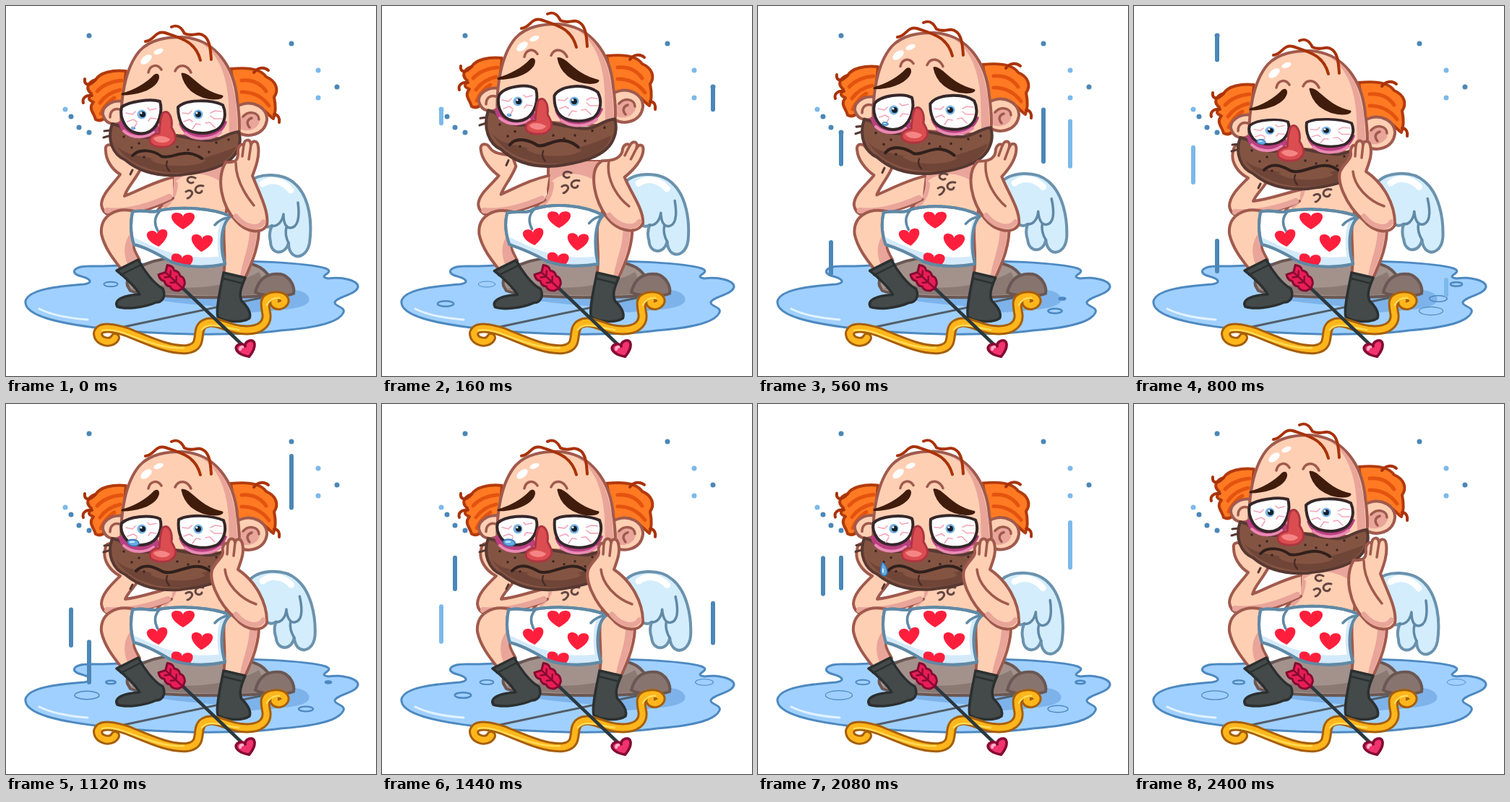
Animation of 512x512 px, one loop 2.48 s. Source, as an HTML page:

```html
<!DOCTYPE html>
<html lang="en">
<head>
<meta charset="utf-8">
<title>Gloomy cupid</title>
<style>
html, body { margin: 0; width: 100%; height: 100%; overflow: hidden; background: #fff; }
svg { display: block; width: 100vw; height: 100vh; stroke-linecap: round; stroke-linejoin: round; }
.line { fill: none; }
.skin { fill: #ffcfb3; stroke: #a05a4d; stroke-width: 4; }
.crease { fill: none; stroke: #a05a4d; stroke-width: 3.5; }
.shade { fill: #e9a59a; }
.rim { fill: none; stroke: #e9a59a; }
.hair { fill: #ff7a22; stroke: #b23a0c; stroke-width: 4; }
.wisp { fill: none; stroke: #a93208; stroke-width: 4; }
.strand { fill: none; stroke: #e4530f; stroke-width: 5; }
.boot { fill: #444a4a; stroke: #2b3031; stroke-width: 3.5; }
.rock { stroke: #6a5753; stroke-width: 4; }
.cloth { fill: #fff; stroke: #6089a5; stroke-width: 4; }
.fold { fill: none; stroke: #6089a5; stroke-width: 3.5; }
.eye { fill: #fff; stroke: #35272a; stroke-width: 4; }
.vein { fill: none; stroke: #f3a5b9; stroke-width: 1.6; }
.brow { fill: #401c0c; stroke: #401c0c; stroke-width: 3; }
</style>
</head>
<body>
<svg viewBox="0 0 512 512">
  <defs>
    <path id="heart" d="M0 11C-18 0 -17 -12 -8 -12C-3 -12 0 -9 0 -6C0 -9 3 -12 8 -12C17 -12 18 0 0 11Z"/>
    <clipPath id="cut"><path data-morph="cloth"/></clipPath>
  </defs>

  <path d="M27 408C32 392 70 388 108 385C122 383 116 377 104 374C88 370 92 360 116 360C150 361 190 356 250 354C330 350 420 356 442 363C458 369 428 374 446 377C465 374 488 380 487 389C484 400 458 402 455 410C454 416 470 416 467 424C460 440 420 446 380 449C330 456 230 456 150 448C70 440 24 428 27 408Z" fill="#a0d0ff" stroke="#4d89c0" stroke-width="3"/>
  <path d="M190 402C240 416 300 412 340 424C380 420 425 420 419 403C412 390 390 392 370 395Z" fill="#7db3ea"/>
  <path class="line" d="M46 419Q70 431 113 434" stroke="#e3f3ff" stroke-width="3"/>
  <g id="ripples" fill="none" stroke="#4d89c0"></g>
  <g id="rain" stroke-width="6"></g>

  <g id="wing">
    <path d="M336 244C350 230 385 230 402 248C420 266 424 300 420 328C417 344 405 350 397 344C392 340 391 334 391 328C386 346 366 344 366 326C364 318 365 310 368 304C362 308 352 305 345 290Z" fill="#d3edfd" stroke="#6b92ad" stroke-width="4"/>
    <path class="line" d="M355 246C368 237 385 243 394 255" stroke="#fff" stroke-width="9"/>
    <path class="fold" d="M404 272C407 295 403 306 394 307C388 307 384 302 384 288C382 300 374 306 368 304M391 328C387 320 386 314 388 306"/>
  </g>

  <path class="rock" d="M168 387C164 368 195 351 230 349C280 345 330 350 352 362C368 372 372 392 366 400C320 405 200 405 172 394Z" fill="#a3918c"/>
  <path d="M172 391C195 389 205 384 228 388C262 394 325 384 350 368L364 398C310 402 215 402 172 391Z" fill="#8b7974"/>
  <path class="rock" d="M345 396C350 376 362 369 380 371C393 374 400 388 398 398C385 403 355 402 345 396Z" fill="#87746f"/>
  <path class="line" d="M163 444L352 404" stroke="#525e68" stroke-width="3"/>

  <path class="skin" d="M230 215V262C226 270 212 274 206 290L302 306L314 215Z"/>
  <path class="shade" d="M232 215H310L300 246C280 228 246 228 232 246Z"/>
  <path class="rim" d="M235 246Q234 266 220 277" stroke-width="6"/>
  <path id="curls" class="line" d="M262 238c-8 -4 -13 1 -10 5c3 3 6 2 7 1M249 257c6 -4 10 0 8 4c-2 3 -4 5 -6 5M273 249c-8 -2 -13 3 -10 8c3 3 7 2 8 -1" stroke="#664742" stroke-width="3"/>

  <path class="skin" data-morph="armL"/>
  <path class="rim" data-morph="armLshade" stroke-width="8"/>

  <g id="legL">
    <path class="skin" d="M178 284C152 278 130 290 132 315C136 335 150 352 161 366L185 352C180 342 172 332 178 318Z"/>
    <path class="shade" d="M174 312C166 322 160 336 168 357L182 350C178 342 172 334 177 326Z"/>
    <path class="boot" d="M153 366L183 351C190 365 205 385 217 391C222 402 216 410 208 410C190 418 165 420 154 416C148 406 165 400 185 399C180 390 165 375 153 366Z"/>
    <path class="line" d="M159 372L187 358" stroke="#2b3031" stroke-width="2.5"/>
  </g>
  <g id="legR">
    <path class="skin" d="M303 294C298 318 306 345 301 372L330 378C342 352 351 330 350 302L320 280Z"/>
    <path class="shade" d="M337 306C338 330 328 350 324 373L329 374C340 350 348 330 347 306Z"/>
    <path class="boot" d="M301 369L331 376C325 390 322 400 326 408C334 416 340 424 337 432C325 440 300 436 293 430C290 420 297 390 301 369Z"/>
    <path class="line" d="M300 377L328 384" stroke="#2b3031" stroke-width="2.5"/>
  </g>

  <path class="cloth" data-morph="cloth"/>
  <g clip-path="url(#cut)">
    <path d="M172 318C200 330 240 356 306 345V368H240L172 335Z" fill="#d3eafa"/>
    <path class="line" d="M303 296Q294 318 300 350" stroke="#d3eafa" stroke-width="10"/>
    <g id="hearts" fill="#ff1f3d">
      <use href="#heart" transform="translate(245 298) scale(1.12 1)"/>
      <use href="#heart" transform="translate(210 322) rotate(-8)"/>
      <use href="#heart" transform="translate(271 329) rotate(4) scale(1.03)"/>
      <use href="#heart" transform="translate(243 356) rotate(6) scale(1.05)"/>
    </g>
  </g>
  <path class="cloth" data-morph="cloth" style="fill:none"/>
  <path id="folds" class="fold" d="M212 285Q202 296 210 311M308 293Q297 294 289 303"/>

  <g class="line" id="bow">
    <path id="limb" d="M151 459C146 469 127 465 127 453C130 441 152 446 167 451C195 462 225 477 250 475C276 472 260 448 274 440C288 432 305 446 325 448C354 451 363 438 360 424C358 412 356 405 368 402C386 398 391 411 379 414C373 415 370 411 372 408" stroke="#a65f0a" stroke-width="14"/>
    <use href="#limb" style="stroke:#ffb61c"/>
    <path d="M133 449C145 446 160 451 172 456C198 466 225 475 246 473M271 448C280 436 300 445 322 448M361 414Q366 403 378 404" stroke="#ffdc58" stroke-width="2.5"/>
  </g>
  <path class="line" d="M240 386L328 470" stroke="#2b383e" stroke-width="4.5"/>
  <g transform="translate(231 378) rotate(43)" stroke="#850b33" stroke-width="3">
    <path d="M-19 -9Q-12 -14 -7 -10Q-1 -14 4 -10Q10 -13 16 -7L19 0L16 7Q10 13 4 10Q-1 14 -7 10Q-12 14 -19 9L-14 0Z" fill="#e91d55"/>
    <path class="line" d="M-12 0H18M-10 -6L-5 0L-10 6M1 -6L6 0L1 6" stroke-width="2.5"/>
  </g>
  <g transform="translate(333 476) rotate(-20)">
    <use href="#heart" transform="scale(.93 .9)" fill="#f23370" stroke="#850b33" stroke-width="4"/>
    <path class="line" d="M-8 -4Q-7 -7 -4 -6" stroke="#ffb2cb" stroke-width="4"/>
  </g>

  <g id="head">
    <path class="hair" d="M166 90C148 88 130 92 124 102C112 106 110 115 118 121C114 128 113 130 121 133C113 142 122 148 124 157C134 162 140 152 142 143C148 134 156 134 162 132Z"/>
    <path class="strand" d="M160 103Q138 105 126 118M158 116Q140 120 130 134M150 127Q138 134 131 149"/>
    <path class="wisp" d="M124 102C114 113 108 108 109 101M119 124C110 123 105 128 107 134"/>
    <path class="hair" d="M311 87C330 85 352 86 360 98C374 104 378 116 371 126C373 136 374 147 370 156C362 150 356 142 348 138C340 132 328 138 320 142Z"/>
    <path class="strand" d="M326 103Q348 101 360 118M326 119Q350 119 364 138"/>
    <path class="wisp" d="M343 92C348 85 357 84 363 89M371 150C377 150 379 156 378 161"/>
    <path class="skin" d="M163 132C144 129 130 142 135 153C139 164 152 166 160 160Z"/>
    <path class="crease" d="M144 154C144 145 150 141 157 143"/>
    <path class="skin" d="M320 139C340 128 362 140 361 158C358 178 335 184 320 174Z"/>
    <path class="shade" d="M324 155C334 143 350 146 351 158C350 170 334 176 324 170Z"/>
    <path class="crease" d="M328 153C336 144 350 147 350 157M337 168C332 162 334 157 340 155"/>
    <path class="skin" d="M160 174C157 130 165 85 185 62C200 46 222 43 243 43C290 45 316 85 320 130C323 150 324 165 322 185Z"/>
    <path class="shade" d="M268 50C296 66 306 100 308 134L309 180L320 180C321 140 318 70 268 50Z"/>
    <g fill="#fff">
      <ellipse cx="211" cy="63" rx="7" ry="3.5" transform="rotate(-22 211 63)"/>
      <ellipse cx="194" cy="74" rx="9" ry="5" transform="rotate(-38 194 74)"/>
    </g>
    <path class="wisp" d="M193 49C205 48 206 34 220 37C240 44 262 48 269 75M229 29C238 25 243 30 247 38C260 44 264 34 275 42C282 48 283 60 284 74"/>

    <g id="jaw">
      <path d="M147 163C139 185 148 206 165 213C185 230 210 236 240 234C275 230 310 222 320 200C325 190 324 180 322 174C305 176 300 184 285 186C262 188 235 176 215 178C195 185 170 183 157 166Z" fill="#845442" stroke="#573832" stroke-width="4"/>
      <path d="M152 192C164 208 188 206 214 214C244 222 292 206 318 195C308 222 270 230 240 231C205 232 166 218 152 192Z" fill="#6f4538"/>
      <path d="M200 212C220 207 256 202 276 214C264 224 210 224 200 212Z" fill="#845442"/>
      <path class="line" data-morph="mouth" stroke="#30201c" stroke-width="4"/>
      <path class="line" d="M223 215Q220 222 226 228" stroke="#4a2d27" stroke-width="2.5"/>
      <path class="line" d="M163 181h0M184 190h0M191 209h0M207 192h0M237 195h0M252 199h0M267 195h0M281 202h0M291 189h0M308 185h0M174 196h0" stroke="#3c2520" stroke-width="3.5"/>
      <path class="line" d="M136 173L145 172M135 182L145 179M175 227L172 233" stroke="#573832" stroke-width="3"/>
    </g>

    <path d="M156 160C157 185 192 191 213 172L208 158Z" fill="#b93f80"/>
    <path class="line" d="M163 173C175 184 193 183 204 175" stroke="#ea8ab3" stroke-width="4"/>
    <path d="M239 162C247 192 296 192 306 160L294 155Z" fill="#b93f80"/>
    <path class="line" d="M248 176C262 187 285 185 297 175" stroke="#ea8ab3" stroke-width="4"/>

    <g id="eyes">
      <path class="eye" data-morph="eyeL"/>
      <path class="eye" data-morph="eyeR"/>
      <path class="vein" d="M166 148l9 2l4 -4M168 160l8 -3l5 3M177 169l4 -7M208 142l-9 2l-3 -3M208 156l-8 -1l-3 4M244 148l9 1l4 -4M246 160l8 -3l4 3M258 170l5 -7l6 1M298 146l-9 -1l-6 3M299 156l-11 0l-5 -4M289 168l-7 -7l-6 1"/>
      <g fill="#78b2e4">
        <circle cx="188" cy="150" r="6.5"/><circle cx="266" cy="150" r="6.5"/>
        <g fill="#14202c"><circle cx="189" cy="150" r="4"/><circle cx="266" cy="150" r="4"/></g>
        <g fill="#fff"><circle cx="187" cy="148" r="1.5"/><circle cx="264" cy="148" r="1.5"/></g>
      </g>
    </g>

    <path d="M217 148C225 142 231 155 229 168C234 176 238 185 231 190C226 197 206 197 200 190C196 180 206 177 212 176C213 165 213 155 217 148Z" fill="#db4d50" stroke="#ad3540" stroke-width="3"/>
    <path d="M204 183C211 177 222 181 227 184C225 191 207 191 204 183Z" fill="#f58585"/>
    <g id="brows">
      <path class="brow" d="M161 122C177 118 195 108 206 96C211 93 212 99 208 105C200 116 180 122 161 122Z"/>
      <path class="brow" d="M244 94C256 94 265 117 299 125C298 128 292 128 288 128C265 127 248 114 244 94Z"/>
      <path class="crease" d="M197 92C199 82 209 79 215 88M234 90C239 79 251 81 256 92"/>
    </g>
    <g id="pool" fill="#66abe4" stroke="#3274b0" stroke-width="1.5">
      <ellipse rx="8" ry="4.5" transform="rotate(8)"/>
      <path class="line" d="M-4 -1L1 -1" stroke="#d8f0ff" stroke-width="2"/>
    </g>
    <g id="tear" fill="#66abe4" stroke="#3274b0" stroke-width="1.5">
      <path d="M-2 -10C5 -3 8 8 1 9C-7 9 -4 -3 -2 -10Z"/>
      <path class="line" d="M-1 0V4" stroke="#d8f0ff" stroke-width="2"/>
    </g>
  </g>

  <path class="skin" data-morph="armR"/>
  <path class="rim" data-morph="armRshade" stroke-width="7"/>
  <path class="crease" data-morph="armRline"/>
</svg>

<script>
const LOOP = 2480, STEP = 80;
const $ = id => document.getElementById(id);

// Each outline: hands thrown out, halfway, slumped.
const shapes = {
  armL: [
    'M231 233C208 238 190 247 165 259C170 247 180 236 185 219L180 208C165 208 155 204 149 196C145 189 134 188 136 199C138 212 152 226 164 236C154 248 134 260 134 275C136 291 152 291 168 288C192 283 212 276 222 270',
    'M231 237C205 243 185 255 164 263C168 250 178 242 186 226L180 205C165 200 155 205 150 197C146 190 136 190 138 200C138 212 146 226 158 233C150 245 132 260 132 275C134 292 150 292 166 289C195 284 220 272 231 266',
    'M231 254C212 258 190 267 165 270C168 262 176 255 182 246L175 210C165 205 155 205 150 198C146 192 138 190 137 202C134 214 142 230 158 238C148 248 132 262 132 277C134 293 150 293 166 290C195 285 218 276 229 270'],
  armLshade: [
    'M142 283C170 286 198 276 218 268',
    'M140 283C168 286 200 276 226 264',
    'M140 285C168 287 200 279 224 270'],
  armR: [
    'M305 213C283 215 287 255 305 287C322 312 352 317 361 300C362 280 340 258 332 238C350 230 368 215 370 201C370 194 364 195 361 200C367 190 358 186 352 194C350 188 342 190 340 200C334 212 315 212 305 213Z',
    'M304 216C290 240 299 278 318 297C332 314 355 316 361 303C364 285 352 262 341 235C346 222 351 208 349 194C348 185 341 186 339 192C338 183 330 184 329 192C325 190 320 194 321 204C321 214 317 217 304 216Z',
    'M287 226C278 238 292 275 318 297C332 314 355 316 361 303C362 275 345 245 321 229C326 215 330 205 327 193C325 185 318 186 317 192C316 184 308 185 307 193C302 191 299 197 300 204C301 212 292 216 287 226Z'],
  armRshade: [
    'M312 288C326 306 348 309 356 298',
    'M318 291C332 308 350 309 356 299',
    'M318 291C332 308 350 309 356 299'],
  armRline: [
    'M311 215C305 235 318 264 341 278M361 200L350 212M352 194L342 206',
    'M318 217C318 240 330 260 343 276M339 192L336 212M329 192L327 208',
    'M303 229C305 250 325 270 346 277M317 192L315 210M307 193L306 208'],
  cloth: [
    'M172 287C188 285 200 288 208 280C235 269 275 272 303 289C292 300 292 335 296 357C265 361 240 358 225 351C206 340 190 336 176 330C170 315 168 300 172 287Z',
    'M175 285C188 280 202 288 212 283C240 277 285 279 311 291C296 302 296 335 303 357C270 364 240 360 225 352C205 340 190 333 177 330C172 315 172 300 175 285Z',
    'M175 285C188 280 202 288 212 284C240 279 285 281 311 292C296 302 296 335 303 357C270 364 240 360 225 352C205 340 190 333 177 330C172 315 172 300 175 285Z'],
  mouth: [
    'M178 207C186 196 205 202 216 208C228 210 245 188 272 209',
    'M175 207C185 196 205 200 215 208C230 213 247 194 271 211',
    'M180 208C192 196 206 203 217 209C236 216 262 188 286 211'],
  eyeL: [
    'M163 143C168 127 202 122 213 134C217 148 212 167 200 174C188 181 172 177 166 167C161 159 161 151 163 143Z',
    'M160 140C170 132 200 128 213 132C217 145 212 165 200 173C188 180 172 176 165 165C160 157 158 148 160 140Z',
    'M160 142C170 132 200 130 213 136C217 147 212 163 200 169C188 175 172 172 165 163C160 156 158 149 160 142Z'],
  eyeR: [
    'M239 143C245 125 285 122 298 138C305 150 302 167 292 174C275 181 252 179 244 167C239 159 238 151 239 143Z',
    'M238 140C250 128 285 130 300 137C306 150 302 165 292 171C275 180 252 176 244 165C239 157 238 150 238 140Z',
    'M239 137C252 129 285 131 301 138C306 150 302 165 292 172C275 179 252 176 244 165C239 157 238 147 239 137Z']
};

// Tables of [time, value].
const headY = [[0, 0], [80, -7], [160, -18], [240, -25], [320, -22], [400, -18], [480, -13], [560, -6], [640, 4], [720, 13], [800, 19], [880, 24], [1120, 23], [2080, 22.5], [2160, 18], [2240, 9], [2320, -1], [2400, 0]];
const pose = [[0, 0], [160, .6], [240, 1.05], [400, 1], [560, .4], [640, -.1], [720, -.6], [800, -1], [2080, -1], [2160, -.85], [2240, -.45], [2320, 0]];
const wingUp = [[0, 0], [320, 1], [1120, 1.1], [1520, 1], [2000, .15], [2240, 0]];
const eyeOpen = [[560, 1], [720, .9], [800, .86], [960, 1]];
const poolSize = [[0, .35], [400, .4], [800, .75], [1120, 1], [1600, 1.05], [1760, .9]];
const tearY = [[1760, 172], [2080, 206], [2240, 226]];

const dark = '#4b87b7', light = '#7cb9ea';
// Rain column: x, top, bottom, colour, start times.
const drops = [
  [115, 41, 385, dark, 767], [395, 52, 410, dark, 405, 1033],
  [432, 89, 400, light, 415, 1930], [458, 112, 385, dark, 121, 1168],
  [432, 127, 400, light, 1560], [82, 143, 385, light, 133, 658, 1179],
  [90, 153, 400, dark, 871, 1929], [101, 168, 385, dark, 243, 1302],
  [115, 175, 385, dark, 489, 1951]
];
// Ripple: x, y, widest radius, start times.
const ripples = [
  [145, 385, 12, 1070, 1270, 1900, 2300], [112, 403, 20, 900, 1390, 1790, 2120],
  [446, 385, 13, 200, 720, 1120, 2050], [421, 405, 14, 560], [411, 422, 18, 520],
  [415, 422, 16, 1040, 1840], [88, 412, 19, 100]
];
const FALL = 340, SPREAD = 360;

function at(keys, t) {
  const i = keys.findIndex(k => k[0] > t);
  if (i < 0) return keys[keys.length - 1][1];
  if (!i) return keys[0][1];
  const [t0, a] = keys[i - 1], [t1, b] = keys[i];
  return a + (b - a) * (t - t0) / (t1 - t0);
}

function mix([out, mid, low], p) {
  const goal = (p > 0 ? out : low).match(/-?[\d.]+/g), w = Math.abs(p);
  let i = 0;
  return mid.replace(/-?[\d.]+/g, n => (+n + (goal[i++] - n) * w).toFixed(2));
}

function add(parent, tag, attrs) {
  const el = document.createElementNS('http://www.w3.org/2000/svg', tag);
  for (const k in attrs) el.setAttribute(k, attrs[k]);
  return parent.appendChild(el);
}

const place = (id, value) => $(id).setAttribute('transform', value);
const morphs = [...document.querySelectorAll('[data-morph]')];

$('limb').removeAttribute('stroke');
$('limb').removeAttribute('stroke-width');
$('bow').querySelector('use').style.strokeWidth = 8;
add($('bow'), 'use', { href: '#limb', stroke: '#a65f0a', 'stroke-width': 14 });
$('bow').prepend($('bow').lastChild);

const streaks = [], rings = [];
for (const [x, y0, y1, stroke, ...starts] of drops) {
  add($('rain'), 'circle', { cx: x, cy: y0, r: 3.5, fill: stroke });
  for (const start of starts)
    streaks.push({ el: add($('rain'), 'line', { x1: x, x2: x, stroke }), y0, y1, start });
}
for (const [cx, cy, max, ...starts] of ripples)
  for (const start of starts)
    rings.push({ el: add($('ripples'), 'ellipse', { cx, cy }), max, start });

function draw(t) {
  const p = at(pose, t), up = Math.max(p, 0), dy = at(headY, t);
  for (const el of morphs) el.setAttribute('d', mix(shapes[el.dataset.morph], p));

  place('head', `translate(0 ${dy})`);
  place('jaw', `translate(0 170) scale(1 ${1 + .14 * up}) translate(0 -170)`);
  place('brows', `translate(0 ${-6 * up + 2 * Math.max(-p, 0)})`);
  place('eyes', `translate(0 174) scale(1 ${at(eyeOpen, t)}) translate(0 -174)`);
  place('wing', `rotate(${-5 * at(wingUp, t)} 345 245)`);
  place('legL', `translate(${4 * up} ${up})`);
  place('legR', `translate(${-6 * up} 0)`);
  place('hearts', `translate(0 ${-3 * up})`);
  place('folds', `translate(${-4 * up} ${-4 * up})`);
  place('curls', `translate(0 ${p < 0 ? -5 * p : -12 * p})`);

  const rolling = t >= 1760 && t < 2240;
  $('pool').style.display = t < 1760 ? '' : 'none';
  $('tear').style.display = rolling ? '' : 'none';
  place('pool', `translate(176 169) scale(${at(poolSize, t)})`);
  place('tear', `translate(174 ${at(tearY, t)})`);

  for (const { el, y0, y1, start } of streaks) {
    const u = (t - start) / FALL, len = y1 - y0;
    const tail = Math.max(0, u - .2);
    el.style.display = u > 0 && u < 1.15 && tail < 1 ? '' : 'none';
    el.setAttribute('y1', y0 + len * tail);
    el.setAttribute('y2', y0 + len * Math.min(1, u));
  }
  for (const { el, max, start } of rings) {
    const u = (t - start + LOOP) % LOOP / SPREAD;
    el.style.display = u < 1 ? '' : 'none';
    if (u >= 1) continue;
    const r = max * (.3 + .7 * Math.sqrt(u));
    el.setAttribute('rx', r);
    el.setAttribute('ry', r * .34);
    el.setAttribute('stroke-width', 2.8 - 2 * u);
  }
}

const begin = performance.now();
function tick() {
  const t = (performance.now() - begin) % LOOP;
  draw(Math.floor(t / STEP) * STEP);
  requestAnimationFrame(tick);
}
tick();
</script>
</body>
</html>
```
